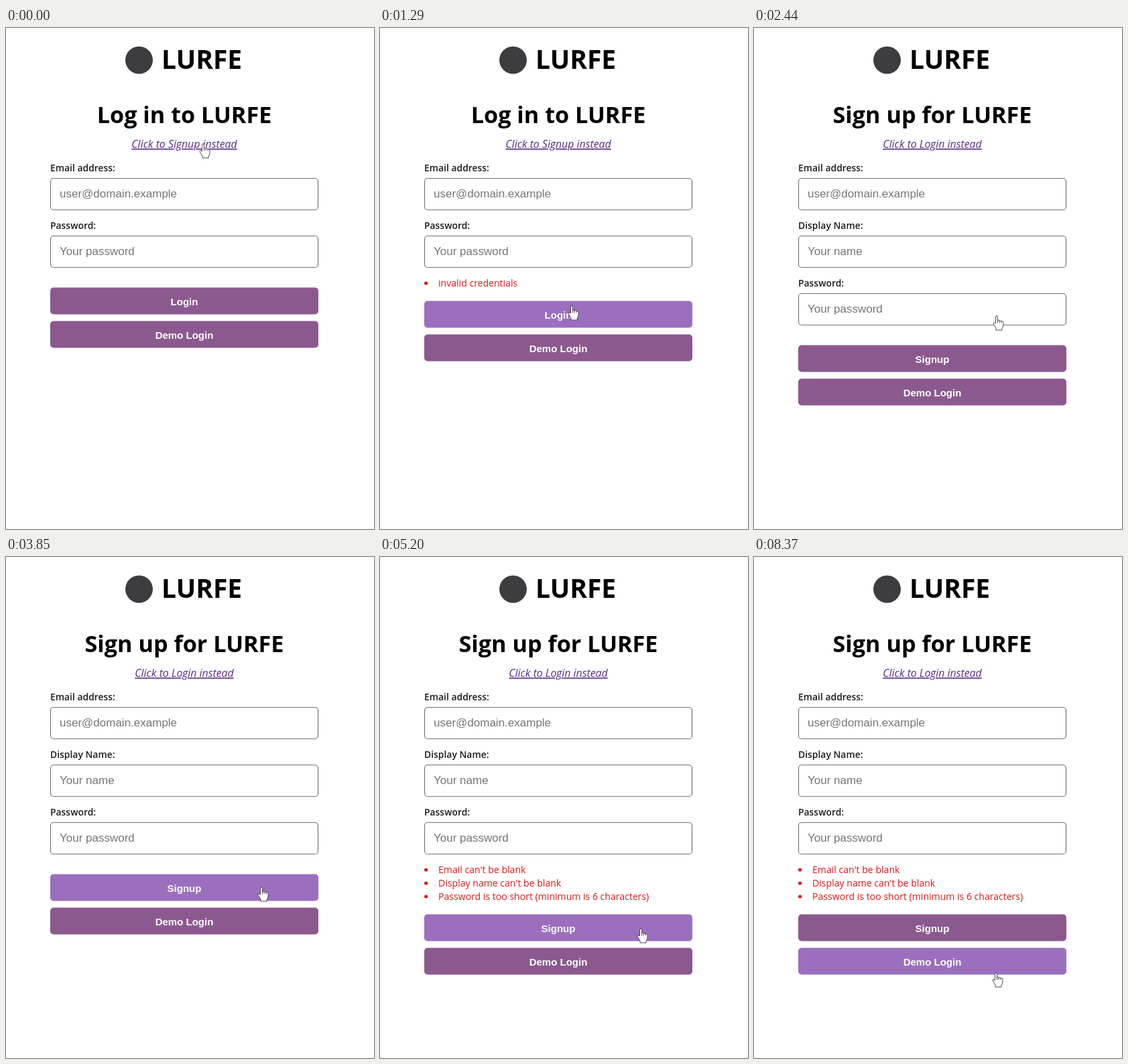
Animation of 549 by 748 pixels, one loop 9.05 s. Source, as an HTML page:

```html
<!DOCTYPE html>
<html lang="en">
<head>
<meta charset="utf-8">
<title>Login form</title>
<style>
  html, body { margin: 0; width: 100%; height: 100%; overflow: hidden; background: #fff; }
  svg { display: block; width: 549px; height: 748px; }
  text { font-family: "Open Sans", "Noto Sans", sans-serif; white-space: pre; }
  .mid { text-anchor: middle; }
  .brand { font-size: 39px; font-weight: 700; }
  .title { font-size: 34.2px; font-weight: 700; }
  .link { font-size: 15.9px; font-style: italic; fill: #5a2a86; text-decoration: underline; text-decoration-thickness: 1px; }
  .label { font-size: 13.9px; font-weight: 600; fill: #1d1c1d; }
  .hint { font: 17px "Liberation Sans", Arial, sans-serif; fill: #757575; }
  .box { fill: #fff; stroke: #747474; stroke-width: 1.2; }
  .error { font-size: 14.07px; fill: #e01515; }
  .caption { font: bold 15px "Liberation Sans", Arial, sans-serif; fill: #fff; }
  .hand { fill: #fff; stroke: #4a4a52; stroke-width: 1; stroke-linejoin: round; stroke-linecap: round; }
</style>
</head>
<body>
<svg viewBox="0 0 549 748">
  <rect width="549" height="748" fill="#fff"/>
  <circle cx="198.5" cy="48" r="20.5" fill="#3d3d3f"/>
  <text class="brand" x="232" y="61">LURFE</text>
  <g id="page"></g>
  <g id="cursor" class="hand">
    <path d="M5 1Q3.5 1 3.5 2.5V12L2 11Q0 10.5 0 12.5L4 19V22H13V20Q15 17 15 14V10Q14 8 12 9 11 7 9 8 8 6.5 6.5 7V2.5Q6.5 1 5 1Z"/>
    <path d="M6.5 7V11M9 8V11M12 9V11" fill="none"/>
  </g>
</svg>
<script>
const LOOP = 9050, TICK = 96;
const ERROR_AT = 890, SIGNUP_AT = 1770, ERRORS_AT = 4130;

// The pointer starts on the link; each move eases on to the next stop
const home = { x: 289, y: 172 };
const moves = [
  { from: 214, to: 600, x: 281, y: 406 },
  { from: 1094, to: 1290, x: 281, y: 414 },
  { from: 1290, to: 1680, x: 300, y: 172 },
  { from: 1870, to: 2540, x: 371, y: 493 },
  { from: 3754, to: 3850, x: 376, y: 492 },
  { from: 3850, to: 4330, x: 533, y: 565 },
  { from: 4330, to: 4810, x: 389, y: 554 },
  { from: 5004, to: 5200, x: 384, y: 554 },
  { from: 5200, to: 5770, x: 356, y: 620 }
];

const email = ["Email address:", "user@domain.example"];
const nickname = ["Display Name:", "Your name"];
const password = ["Password:", "Your password"];
const login = { title: "Log in to LURFE", link: "Click to Signup instead", action: "Login",
  fields: [email, password], errors: ["invalid credentials"] };
const signup = { title: "Sign up for LURFE", link: "Click to Login instead", action: "Signup",
  fields: [email, nickname, password],
  errors: ["Email can't be blank", "Display name can't be blank",
    "Password is too short (minimum is 6 characters)"] };

const page = document.getElementById("page");
const cursor = document.getElementById("cursor");
let shown = "";

const ease = k => k * k * (3 - 2 * k);

// Eased progress of a move, advancing once per tick
function progress({ from, to }, t) {
  const k = Math.min(1, Math.max(0, (t - from) / (to - from)));
  const steps = Math.round((to - from) / TICK);
  return ease(Math.floor(k * steps) / steps);
}

function pointerAt(t) {
  let { x, y } = home;
  for (const move of moves) {
    const k = progress(move, t);
    x += (move.x - x) * k;
    y += (move.y - y) * k;
  }
  return [Math.round(x), Math.round(y)];
}

const text = (style, x, y, words) => `<text class="${style}" x="${x}" y="${y}">${words}</text>`;

function field([label, hint], i) {
  const y = 224.5 + 86 * i;
  return text("label", 66, y - 11, label) +
    `<rect class="box" x="66.5" y="${y}" width="399" height="47" rx="4.5"/>` +
    text("hint", 80, y + 28.5, hint);
}

function errorLine(words, i, top) {
  const y = top + 20 * i;
  return `<circle cx="68.6" cy="${y - 4.5}" r="2.6" fill="#e01515"/>` + text("error", 87, y, words);
}

function button(y, words, hot) {
  return `<rect x="66" y="${y}" width="400" height="40" rx="5" fill="${hot ? "#9b6fbe" : "#8c598f"}"/>` +
    text("caption mid", 266, y + 26, words);
}

function render(t) {
  const form = t < SIGNUP_AT ? login : signup;
  const failed = t >= (form === login ? ERROR_AT : ERRORS_AT);
  const errors = failed ? form.errors : [];
  const [x, y] = pointerAt(t);
  const end = 215.5 + 86 * form.fields.length;
  const top = end + 20 * errors.length;
  const tip = { x: x + 5, y: y + 2 };
  const over = by => tip.x >= 66 && tip.x <= 466 && tip.y >= by && tip.y <= by + 40;

  const markup = text("title mid", 266, 142, form.title) +
    text("link mid", 266, 179, form.link) +
    form.fields.map(field).join("") +
    errors.map((words, i) => errorLine(words, i, end - 2)).join("") +
    button(top, form.action, over(top)) +
    button(top + 50, "Demo Login", over(top + 50));
  if (markup !== shown) page.innerHTML = shown = markup;
  cursor.setAttribute("transform", `translate(${x} ${y})`);
}

const start = performance.now();
function loop() {
  render((performance.now() - start) % LOOP);
  requestAnimationFrame(loop);
}
loop();
</script>
</body>
</html>
```
